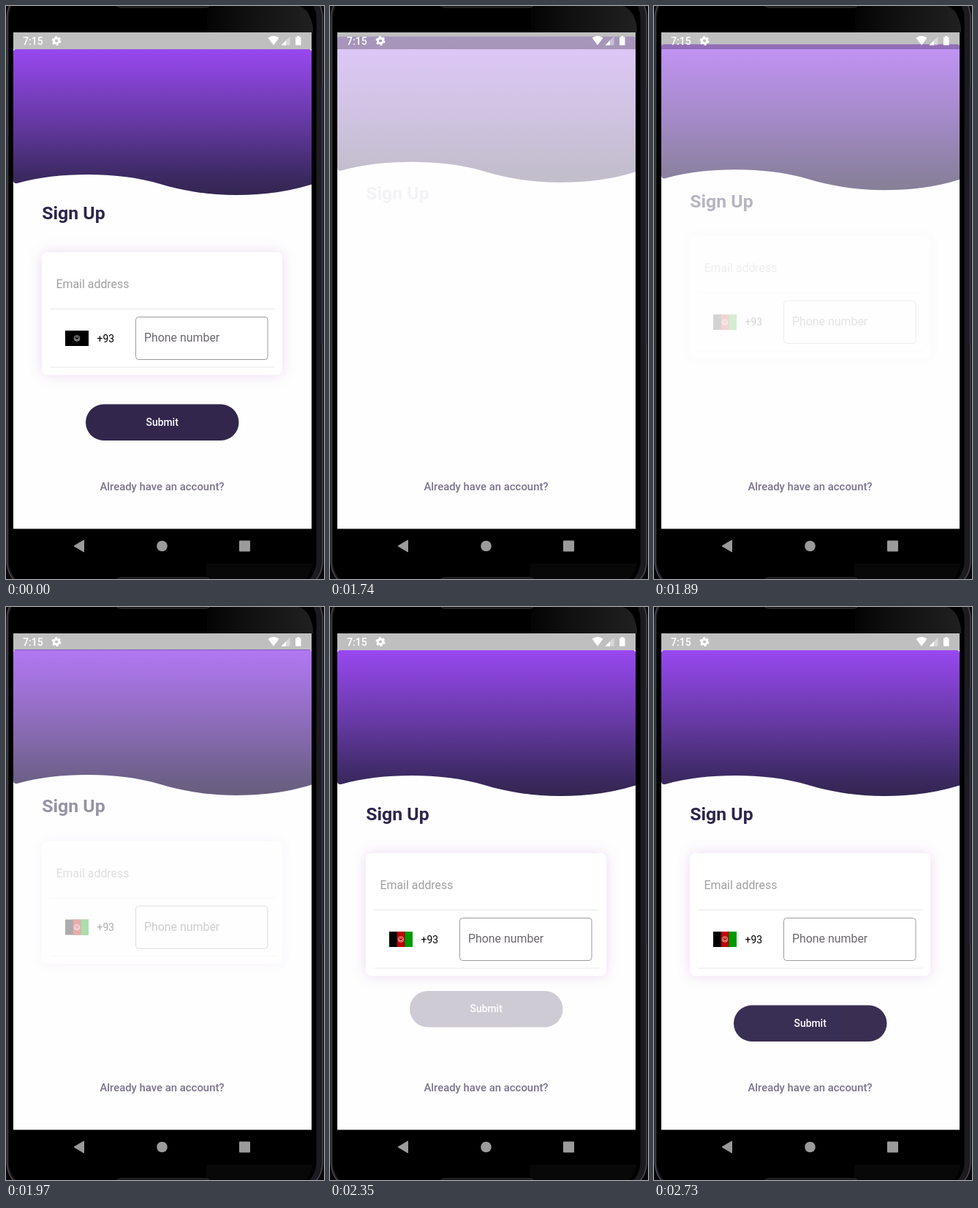
An HTML page for the animation above (3.04 s loop, 435 by 782 pixels).

```html
<!DOCTYPE html>
<html lang="en">
<head>
<meta charset="utf-8">
<title>Sign Up</title>
<style>
  html, body { margin: 0; width: 100%; height: 100%; overflow: hidden; background: #08080a; }
  svg { display: block; width: 435px; height: 782px; font-family: Roboto, sans-serif; }
  .medium { font-weight: 500; }
  #card .box { filter: drop-shadow(0 0 9px rgba(165, 70, 185, .2)); }
</style>
</head>
<body>
<svg viewBox="0 0 435 782">
  <defs>
    <linearGradient id="purple" x2="0" y2="1">
      <stop stop-color="#9848f0"/>
      <stop offset=".5" stop-color="#6539a3"/>
      <stop offset=".88" stop-color="#3b2961"/>
      <stop offset="1" stop-color="#33264f"/>
    </linearGradient>
    <linearGradient id="sheen" x2="1" y2="0">
      <stop stop-color="#040404"/>
      <stop offset=".4" stop-color="#111"/>
      <stop offset="1" stop-color="#202020"/>
    </linearGradient>
  </defs>

  <!-- phone body -->
  <rect x="1.5" y="-24" width="431.500" height="822" rx="40" fill="#1b1b20" stroke="#4a4951" stroke-width="1.500"/>
  <rect x="4" y="-20" width="420.500" height="814" rx="36"/>
  <path d="M275 0H400Q416 4 420 30V36H275Z" fill="url(#sheen)"/>
  <path d="M274 761H420Q416 776 410 782H274Z" fill="#080808"/>
  <path d="M432 110V460" stroke="#2b2546" stroke-width="2"/>
  <path d="M152 0Q154 2 158 2H272Q276 2 278 0M152 782Q154 780 158 780H272Q276 780 278 782" fill="#111" stroke="#3a3a3a"/>

  <!-- screen -->
  <rect x="10" y="36" width="408" height="677.500" fill="#fefefe"/>
  <g id="header">
    <path fill="url(#purple)" d="M10 63Q10 59 14 59H414Q418 59 418 63V243.500C385 254 350 258 315 258C280 258 245 253 213 243.500C180 233.500 145 230 112 230C78 230 45 233.500 15 242Q10 242.500 10 238Z"/>
  </g>
  <text id="title" x="49.300" y="290.500" font-size="24.800" font-weight="700" fill="#2e254d">Sign Up</text>

  <g id="card">
    <rect class="box" x="49" y="336" width="329" height="167.500" rx="8" fill="#fff"/>
    <path d="M60 413.500H368M60 493H368" stroke="#e9e8ea"/>
    <text x="68.500" y="385.300" font-size="15.900" fill="#a09fa1">Email address</text>
    <rect x="81" y="443" width="32" height="21"/>
    <g id="stripes">
      <rect x="91.700" y="443" width="10.700" height="21" fill="#be0000"/>
      <rect x="102.400" y="443" width="10.600" height="21" fill="#009900"/>
    </g>
    <g fill="none" stroke="#fff" opacity=".65">
      <circle cx="97" cy="453.500" r="3.800"/>
      <path d="M95 455.500V453L97 451L99 453V455.500Z"/>
    </g>
    <text x="124.500" y="458.500" font-size="13.900">+93</text>
    <rect x="177.500" y="424.500" width="180.500" height="58" rx="4" fill="none" stroke="#9c9a9d"/>
    <text x="189" y="458.200" font-size="15.900" fill="#6c686e">Phone number</text>
  </g>

  <g id="button">
    <rect x="109" y="543.500" width="209.500" height="49.500" rx="24.750" fill="#32264d"/>
    <text class="medium" x="213.700" y="573" font-size="13.900" text-anchor="middle" fill="#fff">Submit</text>
  </g>
  <text class="medium" x="213.500" y="661.300" font-size="14.880" text-anchor="middle" fill="#7b738c">Already have an account?</text>

  <!-- status bar -->
  <rect x="10" y="36" width="408" height="23" opacity=".25"/>
  <g fill="#fff">
    <text class="medium" x="23" y="52.700" font-size="14">7:15</text>
    <circle cx="69" cy="47.500" r="3.600" fill="none" stroke="#fff" stroke-width="3"/>
    <circle cx="69" cy="47.500" r="5.400" fill="none" stroke="#fff" stroke-width="2.200" stroke-dasharray="2.900 2.755"/>
    <path d="M358.500 43.500Q366 38 373.500 43.500L366 53.500Z"/>
    <path d="M376.500 53.500L388.500 41.500V53.500Z" opacity=".4"/>
    <path d="M376.500 53.500L383 47V53.500Z"/>
    <path d="M396 42.500H398V41H401.500V42.500H403.500V53.500H396Z"/>
  </g>

  <!-- navigation bar -->
  <g fill="#9b9b9b">
    <path d="M93 737L106.500 729V745Z" stroke="#9b9b9b" stroke-linejoin="round"/>
    <circle cx="213.500" cy="737" r="7.300"/>
    <rect x="319" y="729.500" width="15" height="15" rx="1"/>
  </g>
</svg>
<script>
  const LOOP = 3040, RESET = 1660, FIRST = 1740, FADE = 520;
  const DROP = 28, SPEED = 0.07;
  const starts = { header: 1585, title: 1716, card: 1805, button: 2230 };
  const ticks = [RESET, FIRST, 1820, 1890, 1970, 2060, 2140, 2190, 2270, 2350, 2430, 2500, 2580, 2660, 2730];
  const byId = id => document.getElementById(id);

  // Each part fades in while it drops into place.
  function draw(time) {
    const t = ticks.filter(tick => tick <= time).pop() ?? 0;
    const rest = t < RESET;
    for (const id in starts) {
      const age = t < FIRST ? 0 : Math.max(0, t - starts[id]);
      const alpha = rest ? 1 : Math.min(1, age / FADE);
      const y = rest ? 0 : Math.min(0, age * SPEED - DROP);
      byId(id).setAttribute('opacity', alpha);
      byId(id).setAttribute('transform', `translate(0 ${y})`);
    }
    byId('stripes').setAttribute('opacity', rest ? 0 : 1);
  }

  const begin = performance.now();
  function loop() {
    draw((performance.now() - begin) % LOOP);
    requestAnimationFrame(loop);
  }
  loop();
</script>
</body>
</html>
```
